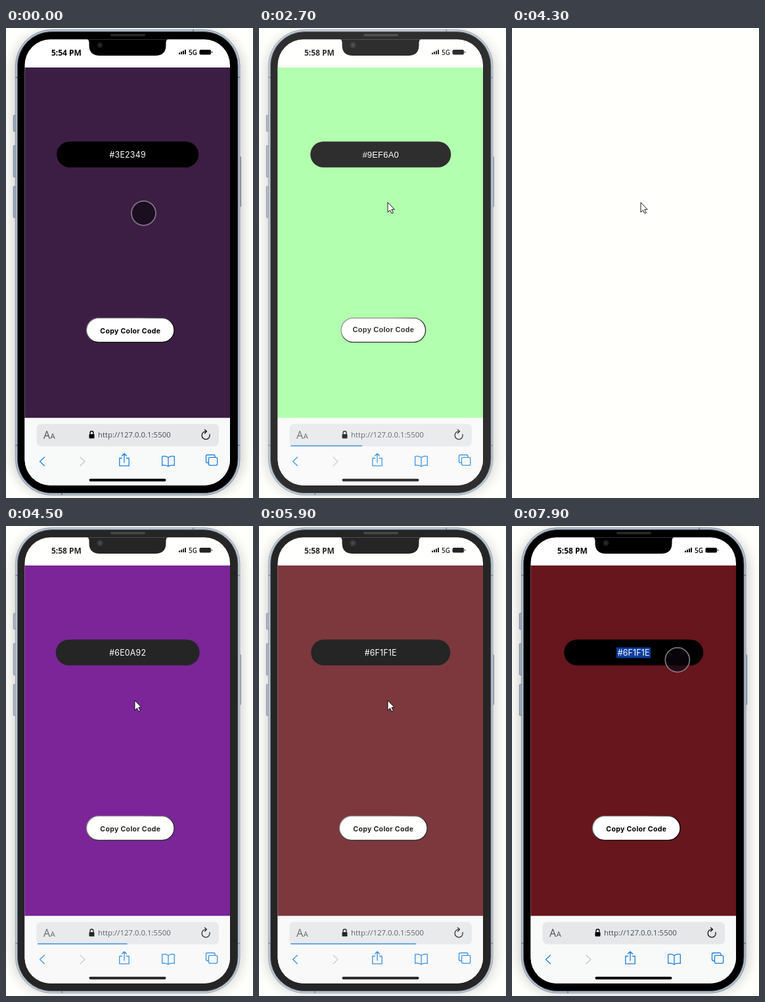
An HTML page for the animation above (8 s loop, 376 by 714 pixels).

```html
<!DOCTYPE html>
<html lang="en">
<head>
<meta charset="utf-8">
<title>Random color phone</title>
<style>
  html, body { margin: 0; width: 100%; height: 100%; overflow: hidden; background: #fffffc; }
  svg { display: block; width: 376px; height: 714px; }
  text { font-family: "Open Sans", sans-serif; }
  .app { font-family: Inter, sans-serif; text-anchor: middle; }
  .app.plain { font-family: "Liberation Sans", Arial, sans-serif; letter-spacing: 0; }
  #code { font-size: 12.4px; letter-spacing: .2px; fill: #fff; }
  #code.plain { font-size: 13px; }
  #label { font-size: 10.6px; font-weight: 650; letter-spacing: .3px; }
  #label.plain { font-size: 10.9px; font-weight: 700; }
  .icon { fill: none; stroke: #1c80dc; stroke-width: 1.3; stroke-linecap: round; stroke-linejoin: round; }
</style>
</head>
<body>
<svg viewBox="0 0 376 714">
  <defs>
    <filter id="soft" x="-20%" y="-10%" width="140%" height="120%"><feGaussianBlur stdDeviation="9"/></filter>
    <linearGradient id="bevel" x2="1" y2="1">
      <stop offset=".3" stop-color="#777"/><stop offset=".6" stop-color="#000"/>
    </linearGradient>
    <clipPath id="screen"><rect x="28.500" y="17.300" width="312.500" height="677.400" rx="39"/></clipPath>
  </defs>
  <rect width="376" height="714" fill="#fffffc"/>

  <g id="phone">
    <rect x="10" y="6" width="351" height="704" rx="58" fill="#555" opacity=".28" filter="url(#soft)"/>
    <g fill="#a3afbf" stroke="#566275" stroke-width=".7">
      <rect x="11.300" y="132.500" width="3.400" height="24.500" rx="1.200"/>
      <rect x="11.300" y="178.500" width="3.400" height="48" rx="1.200"/>
      <rect x="11.300" y="240.500" width="3.400" height="47.500" rx="1.200"/>
      <rect x="355" y="195.500" width="2.600" height="76" rx="1"/>
    </g>
    <rect x="14.400" y="2.600" width="341.600" height="707" rx="55" fill="#b4c0cf" stroke="#7c899c" stroke-width=".8"/>
    <path d="M14 75h4M14 634h4M352 75h4M352 634h4M85 706v4M285 2v4" stroke="#7b889a" stroke-width="2.200"/>
    <rect x="17.400" y="5.600" width="335.600" height="701" rx="52" stroke="#566274" stroke-width=".8"/>
    <rect x="159" y="9" width="53" height="3.500" rx="1.700" fill="#292929"/>

    <g clip-path="url(#screen)">
      <rect x="28" y="17" width="314" height="678" fill="#fff"/>
      <rect id="page" x="28" y="60" width="314" height="532.500"/>
      <rect x="28" y="592.500" width="314" height="104" fill="#f8f9f9"/>
      <path d="M121 16H249Q243.500 17 243.500 22V26Q243.500 42 227 42H143Q126.500 42 126.500 26V22Q126.500 17 121 16Z"/>
    </g>
    <circle cx="143" cy="26" r="4.500" fill="#17191e"/>
    <circle cx="143" cy="26" r="2" fill="#292d38"/>

    <text id="clock" x="69" y="42" font-size="12" font-weight="700"></text>
    <path d="M264 40v-2.500M267 40v-4M270 40v-5.500M273 40v-7" stroke="#000" stroke-width="2"/>
    <text x="278" y="41" font-size="10" font-weight="600">5G</text>
    <rect x="294.500" y="33" width="17.500" height="7.500" rx="2"/>
    <path d="M313.500 35.500v2.500" stroke="#000"/>

    <rect id="pill" y="172.400" height="39.400" rx="19.700"/>
    <rect id="mark" x="159" y="184.500" width="52" height="16" fill="#0c3e9f"/>
    <text id="code" class="app" x="185.200" y="197"></text>
    <rect id="button" y="440.700" height="36.700" rx="18.350" fill="#fff" stroke="url(#bevel)" stroke-width="1.300"/>
    <text id="label" class="app" x="189.300">Copy Color Code</text>

    <rect x="46.500" y="601.500" width="277.500" height="34" rx="7" fill="#e6e7e9"/>
    <rect id="bar" x="48" y="633.900" height="1.600" fill="#2583e3"/>
    <g fill="#4d5256"><text x="57" y="624" font-size="16">A</text><text x="67.500" y="624" font-size="11.500">A</text></g>
    <rect x="126.500" y="617" width="8" height="6.500" rx="1"/>
    <path d="M128 617v-2a2.500 2.500 0 0 1 5 0v2" fill="none" stroke="#000" stroke-width="1.300"/>
    <text x="140" y="622" font-size="11.400" fill="#424c57">http://127.0.0.1:5500</text>
    <path class="icon" style="stroke:#111" d="M310 617.500a6 6 0 1 1-5-4.600M302.500 610.200l3 2.600-3 2.900"/>
    <path class="icon" d="M58.500 652l-7 6.500 7 6.500"/>
    <path class="icon" style="stroke:#c3c6ca" d="M113 652l7 6.500-7 6.500"/>
    <path class="icon" d="M176.500 653.500h-3.700v11.700h14.400v-11.700h-3.700M180 660v-13M176.500 650l3.500-3.500 3.500 3.500"/>
    <path class="icon" d="M247 652.500q-4-3-9.300-1.700v13.700q5.300-1 9.300 1.500 4-2.500 9.300-1.500v-13.700q-5.300-1.300-9.300 1.700v13.500"/>
    <path class="icon" d="M308 660.500h-1.500q-2 0-2-2v-8q0-2 2-2h9.500q2 0 2 2v1.500"/>
    <rect class="icon" x="308.500" y="652.300" width="13.200" height="12" rx="2"/>
    <rect x="126.500" y="684.800" width="117" height="4" rx="2"/>
  </g>

  <circle id="touch" r="18.500" fill="#0c0710" fill-opacity=".68" stroke="#8d8790" stroke-opacity=".85" stroke-width="1.800"/>
  <path id="arrow" d="M0 0V15L3.500 11.700 6 16.700 8.300 15.600 5.900 10.700H10.200Z" fill="#fff" stroke="#000" stroke-width=".9"/>
</svg>
<script>
const LOOP = 8000, STEP = 100;
const $ = id => document.getElementById(id);
const set = (id, attrs) => { for (const k in attrs) $(id).setAttribute(k, attrs[k]); };
const show = (id, on) => set(id, { visibility: on ? "visible" : "hidden" });

// Each page load: time it begins, first paint, colors, pill width, progress points [ms, share]
const loads = [
  { at: -2000, paint: -1000, code: "#3E2349", fill: "#3c1e45", pill: 216, bar: [[0, 1]] },
  { at: 2400, paint: 2520, code: "#9EF6A0", fill: "#a1ff9e", pill: 218, bar: [[100, .1], [300, .4], [1000, .85], [1300, 1]] },
  { at: 4300, paint: 4300, code: "#6E0A92", fill: "#640088", pill: 219, bar: [[0, .1], [200, .5], [1000, 1]] },
  { at: 5700, paint: 5700, code: "#6F1F1E", fill: "#66161c", pill: 212, bar: [[0, .1], [200, .7], [800, 1]] }
];
const BAR_LIFE = 1500;
const pointerX = [[800, 209.5], [1000, 196], [6500, 196], [7400, 186], [7600, 186], [7900, 251.8]];
const pointerY = [[800, 281.3], [1000, 265], [6500, 265], [7400, 196], [7600, 196], [7900, 203.3]];
const touches = [[0, 1600], [3900, 4300], [5200, 5300], [6600, LOOP]];

function track(points, t) {
  let [t0, v0] = points[0];
  for (const [t1, v1] of points) {
    if (t < t1) return t <= t0 ? v0 : v0 + (v1 - v0) * (t - t0) / (t1 - t0);
    t0 = t1;
    v0 = v1;
  }
  return v0;
}

function draw(t) {
  const load = loads.filter(l => l.at <= t).pop();
  const age = t - load.at;
  const p = Math.min(1, Math.max(0, (t - load.paint) / 1000));
  set("phone", { opacity: 1 - (1 - p) ** 8.5 });

  // The web font arrives late on the first reload
  const plain = t >= 2400 && t < 2800;
  for (const id of ["code", "label"]) $(id).classList.toggle("plain", plain);
  const pill = plain ? 214 : load.pill, button = plain ? 128.5 : 133.5;
  set("pill", { x: 185.2 - pill / 2, width: pill });
  set("button", { x: 189.3 - button / 2, width: button });
  set("label", { y: plain ? 462 : 463.5 });
  set("page", { fill: load.fill });
  $("code").textContent = load.code;
  $("clock").textContent = t < 2400 ? "5:54 PM" : "5:58 PM";

  set("bar", { width: 273 * track(load.bar, age) });
  show("bar", age < BAR_LIFE);
  show("mark", t >= 7700);

  const touching = touches.some(([a, b]) => t >= a && t < b);
  const at = { transform: `translate(${track(pointerX, t)} ${track(pointerY, t)})` };
  set("touch", at);
  set("arrow", at);
  show("touch", touching);
  show("arrow", !touching);
}

const start = performance.now();
function tick() {
  const t = (performance.now() - start) % LOOP;
  draw(Math.floor(t / STEP) * STEP);
  requestAnimationFrame(tick);
}
tick();
</script>
</body>
</html>
```
